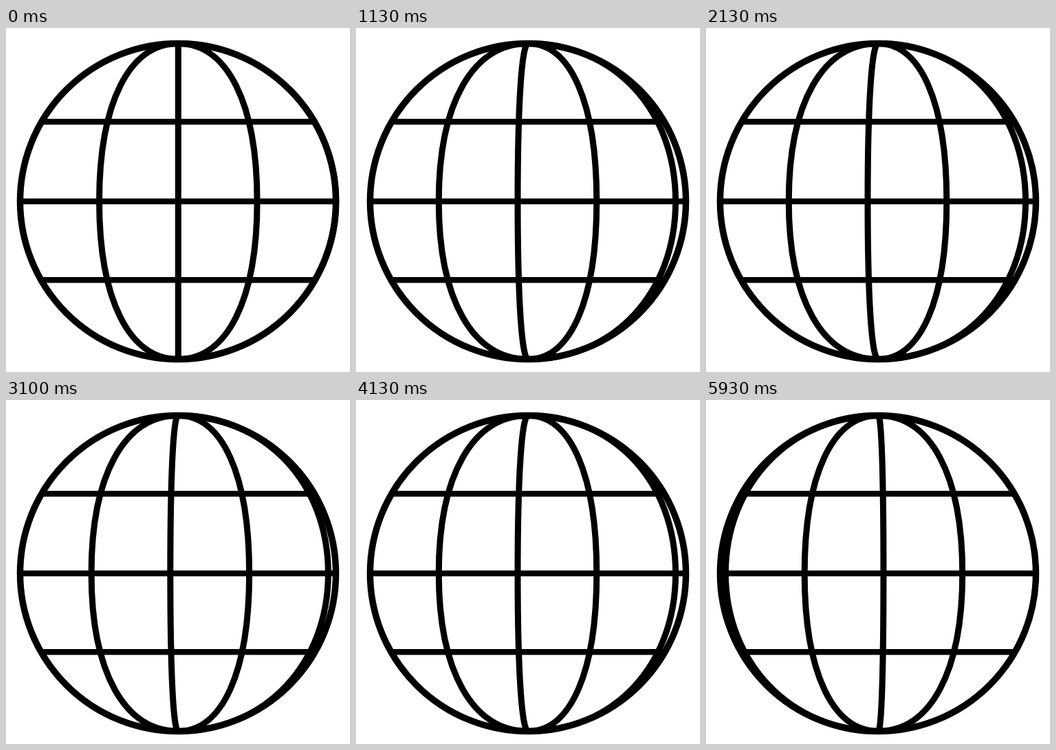
These frames come from a looping animation (500x500 px, 6.01 s). An HTML page:

```html
<!DOCTYPE html>
<html lang="en">
<head>
<meta charset="utf-8">
<title>Turning globe</title>
<style>
  html, body { margin: 0; width: 100%; height: 100%; overflow: hidden; background: #fff; }
  svg { display: block; width: 100%; height: 100%; }
</style>
</head>
<body>
<svg viewBox="0 0 500 500" fill="none" stroke="#000" stroke-width="9">
  <circle cx="250" cy="252" r="229.5" stroke-width="9.5"/>
  <path d="M53 136.3H447M20 252H480M53 366.3H447" stroke-width="8.6"/>
  <path id="meridians"/>
</svg>
<script>
const CX = 250.3, CY = 252, R = 229.5, GAP = R / 2;
const LOOP = 6010, TURN = 1000;
const meridians = document.getElementById('meridians');

// Half oval from pole to pole; it rounds into the rim as it nears it.
function meridian(x) {
  const k = 0.552 + 0.07 * (1 - Math.abs(x / R) ** 8);
  const side = CX + x, top = CY - R, bottom = CY + R, near = CX + x * k;
  return `M${CX} ${top}C${near} ${top} ${side} ${CY - R * k} ${side} ${CY}` +
         `S${near} ${bottom} ${CX} ${bottom}`;
}

// Two steps in every 100 ms, with the last one held until the loop ends.
function stepTime(ms) {
  const t = Math.min(ms % LOOP, 5999);
  return Math.floor(t / 100) * 100 + (t % 100 < 30 ? 0 : 33);
}

function draw(now) {
  const shift = stepTime(now) % TURN / TURN;
  meridians.setAttribute('d', [-1, 0, 1, 2].map(i => meridian((i - shift) * GAP)).join(''));
  requestAnimationFrame(draw);
}
draw(0);
</script>
</body>
</html>
```
